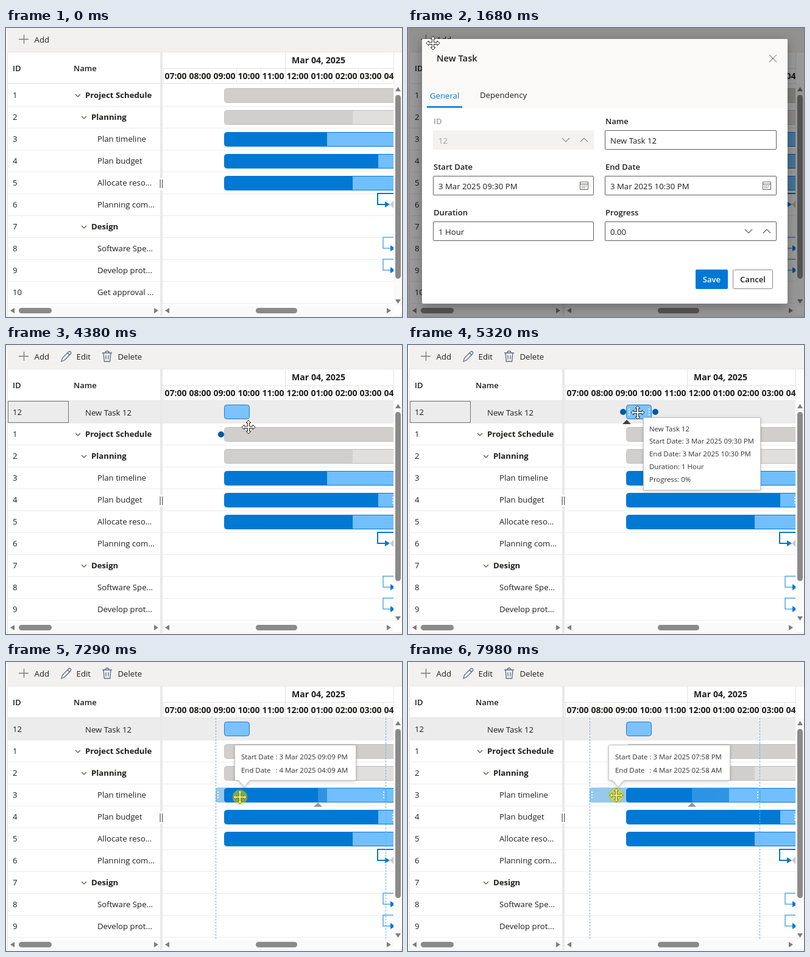
Recreate the animation shown at these times as an HTML page. Size 650x475 px, loop 8000 ms.

```html
<!DOCTYPE html>
<html lang="en">
<head>
<meta charset="utf-8">
<title>Project schedule</title>
<style>
html, body { margin: 0; width: 100%; height: 100%; overflow: hidden; background: #fff; }
svg { display: block; width: 650px; height: 475px; }
text { font: 13.2px "Open Sans", "Noto Sans", sans-serif; fill: #1f1e1d; white-space: pre; }
.b { font-weight: 700; font-size: 13.2px; }
.s { font-weight: 600; font-size: 13.1px; }
.h { font-weight: 700; font-size: 14.1px; text-anchor: middle; }
.title { font-weight: 600; font-size: 14.7px; }
.tip text { font-size: 11.45px; fill: #323130; }
.tip path { fill: #fff; stroke: #c4c4c4; filter: drop-shadow(0 1px 2px rgba(0,0,0,.25)); }
.line { fill: none; stroke: #605e5c; }
</style>
</head>
<body>
<svg id="stage" viewBox="0 0 650 475" xmlns="http://www.w3.org/2000/svg"></svg>
<script>
const BLUE = '#0078d4', LIGHT = '#71bfff', LOOP = 8000, ROW = 36, TOP = 92;

const rect = (x, y, w, h, fill, more = '') =>
  `<rect x="${x}" y="${y}" width="${w}" height="${h}" fill="${fill}" ${more}/>`;
const text = (x, y, s, more = '') => `<text x="${x}" y="${y}" ${more}>${s}</text>`;
const path = (d, more = 'class="line"') => `<path d="${d}" ${more}/>`;
const group = (id, body, more = '') => `<g id="${id}" ${more}>${body}</g>`;
const chevron = (x, y, r, up, color = '#605e5c') => {
  const k = up ? -r / 2 : r / 2;
  return path(`M${x - r} ${y - k}L${x} ${y + k}L${x + r} ${y - k}`, `fill="none" stroke="${color}" stroke-width="1.2"`);
};
const dots = (x, y) => [-4.5, 0, 4.5].map(d => rect(x - 1, y + d - 1, 2, 2, '#fff', 'opacity=".9"')).join('');
const knob = (x, y) => `<circle cx="${x}" cy="${y}" r="5" fill="#005a9e"/>`;
const mark = (x, y, fill) => path(`M${x - 7} ${y}L${x} ${y - 7}L${x + 7} ${y}Z`, `fill="${fill}"`);

// Task rows: name, indent level, progress edge, kind
const tasks = [
  ['Project Schedule', 0, 640, 'sum'],
  ['Planning', 1, 569, 'sum'],
  ['Plan timeline', 2, 527, 'task'],
  ['Plan budget', 2, 611, 'task'],
  ['Allocate reso...', 2, 569, 'task'],
  ['Planning com...', 2, 0, 'stone'],
  ['Design', 1, 0, ''],
  ['Software Spe...', 2, 0, 'link'],
  ['Develop prot...', 2, 0, 'link'],
  ['Get approval ...', 2, 0, '']
];

const bar = (y, edge, kind) => {
  const [dark, pale, rim] = kind === 'sum' ? ['#d0cfce', '#e1dfdd', '#bdbbb9'] : [BLUE, LIGHT, BLUE];
  return rect(358.5, y + 7.5, 300, 23, pale, `rx="4" stroke="${rim}"`) +
    path(`M${edge} ${y + 8}H362.5q-4 0-4 4v14q0 4 4 4H${edge}z`, `fill="${dark}"`);
};

const link = (x, y, color, w) =>
  path(`M640 ${y - 18}H${x}V${y}H${x + 14}`, `fill="none" stroke="${color}" stroke-width="${w}"`) +
  path(`M${x + 12} ${y - 5}l8 5-8 5z`, `fill="${BLUE}"`);

function drawRow([name, level, edge, kind], i) {
  const y = TOP + i * ROW, mid = y + 18, bold = level < 2;
  const x = 130 + level * 10;
  let out = text(11, mid + 5, i + 1) + text(x, mid + 5, name, bold ? 'class="b"' : '');
  if (bold) out += chevron(x - 12, mid + 1, 4, false, '#5a5046');
  out += rect(3, y + ROW, 633, 1, '#ececec');
  let chart = '';
  if (edge) chart = bar(y, edge, kind);
  if (kind === 'stone') chart = link(610, mid, '#0a74c9', 2) + path(`M630 ${mid}l9-9v18z`, 'fill="#cbc9c7"');
  if (kind === 'link') chart = link(619, mid, '#55a9ea', 1.5);
  return out + `<g clip-path="url(#chart)">${chart}</g>`;
}

const thumb = (x, y, w, h, id = '') => rect(x, y, w, h, '#8a8a8a', `rx="4.5" ${id}`);
const arrow = d => path(d, 'fill="#7d7d7d"');

function frameParts() {
  let out = rect(2, 0, 648, 39, '#f2f1f0') + rect(2, 39, 648, 1, '#e8e7e6');
  out += rect(2, 40, 1, 433, '#e4e4e4') + rect(2, 472.5, 648, 1, '#e4e4e4');
  out += rect(3, 91, 633, 1, '#e4e4e4') + rect(257, 66, 379, 1, '#e4e4e4') + rect(636, 40, 1, 52, '#e4e4e4');
  out += text(11, 71, 'ID', 'class="s"') + text(111, 71, 'Name', 'class="s"');
  out += rect(458, 40, 1, 26, '#e4e4e4') + text(513, 58, 'Mar 04, 2025', 'class="h"');
  let hours = '';
  for (let i = 0; i < 10; i++) {
    const h = String((i + 6) % 12 + 1).padStart(2, '0');
    hours += rect(258 + i * 40, 66, 1, 25, '#e4e4e4') + text(278.5 + i * 40, 84, h + ':00', 'class="h"');
  }
  return out + `<g clip-path="url(#chart)">${hours}</g>`;
}

function bars() {
  return rect(3, 457, 633, 16, '#fafafa') + rect(636, 92, 14, 365, '#fafafa') +
    thumb(21, 460, 54, 9) + thumb(410, 460, 68, 9) + thumb(639, 110, 9, 302, 'id="vthumb"') +
    arrow('M7 464.5l7-4.5v9z') + arrow('M250 464.5l-7-4.5v9z') +
    arrow('M261 464.5l7-4.5v9z') + arrow('M632 464.5l-7-4.5v9z') +
    arrow('M643.5 97l4.5 7h-9z') + arrow('M643.5 453l4.5-7h-9z') +
    rect(253, 40, 4, 433, '#e9e9e9') + rect(251, 246, 8, 20, '#fff') +
    rect(252.5, 249, 1.3, 14, '#605e5c') + rect(256, 249, 1.3, 14, '#605e5c');
}

function tools() {
  const pen = path('M91 27l1.5-5.5L103 11q1.5-1.2 3 .3t.3 3L96 25zM101 13l3.5 3.5', 'fill="none" stroke="#5c6b82" stroke-width="1.3"');
  const bin = path('M158 13h16M163 13q0-3 3-3t3 3M160 13l1.3 14h9.4L172 13M164 17v6.5M168 17v6.5', 'fill="none" stroke="#5c6b82" stroke-width="1.3"');
  return rect(11, 0, 69, 39, '#e3e1df', 'id="addHover"') +
    path('M21 18.5h16M29.5 11v15', 'stroke="#7b7774" stroke-width="1.3"') + text(46.6, 24, 'Add') +
    group('extra', pen + text(115.6, 24, 'Edit') + bin + text(183.4, 24, 'Delete'));
}

function newRow() {
  return rect(3, 92, 633, 36, '#edecec') + rect(3, 128, 633, 1, '#ececec') +
    rect(3.5, 92.5, 99, 35, 'none', 'id="cell" stroke="#767472"') +
    text(11, 115, '12') + text(130, 116, 'New Task 12') +
    rect(358.5, 98.5, 41, 23, '#7cc2fd', 'rx="4" stroke="#0f80d8"') +
    `<g clip-path="url(#chart)">${dots(635, 255)}</g>`;
}

const calendar = (x, y) => path(`M${x - 6.5} ${y - 6}h13v12.5h-13zM${x - 6.5} ${y - 2.5}h13`) +
  path(`M${x - 4} ${y + 0.5}h8.5M${x - 4} ${y + 3.5}h6`, 'fill="none" stroke="#605e5c" stroke-width="1.5" stroke-dasharray="1.6 1.6"');

function field(col, row, label, value, kind) {
  const x = col ? 323 : 41, w = col ? 282 : 264, y = 168 + row * 75, off = kind === 'off';
  let out = text(x + 1, y - 10, label, off ? 'class="s" style="fill:#a19f9d"' : 'class="s"');
  out += off ? rect(x, y, w, 32, '#f3f2f1')
    : rect(x + .5, y + .5, w - 1, 31, '#fff', 'rx="1.5" stroke="#605e5c"');
  out += text(x + 9, y + 22, value, off ? 'style="fill:#a19f9d"' : '');
  const end = x + w - 16;
  if (kind === 'date') out += calendar(end, y + 16);
  if (kind === 'spin' || off)
    out += chevron(end - 30, y + 16, 6, false, off ? '#8a8886' : '#605e5c') + chevron(end, y + 16, 6, true, off ? '#8a8886' : '#605e5c');
  return out;
}

function dialog() {
  return rect(23, 18, 600, 435, '#fff', 'rx="2" style="filter:drop-shadow(0 5px 9px rgba(0,0,0,.3))"') +
    rect(23, 18, 600, 113.5, '#faf9f8', 'rx="2"') +
    text(47, 55, 'New Task', 'class="title"') + path('M593 44l12 12M605 44l-12 12') +
    text(36, 116, 'General', `style="fill:${BLUE}"`) + text(118, 115, 'Dependency') +
    rect(31, 128.5, 58, 2.5, BLUE, 'id="tab"') +
    field(0, 0, 'ID', '12', 'off') + field(1, 0, 'Name', 'New Task 12') +
    field(0, 1, 'Start Date', '3 Mar 2025 09:30 PM', 'date') + field(1, 1, 'End Date', '3 Mar 2025 10:30 PM', 'date') +
    field(0, 2, 'Duration', '1 Hour') + field(1, 2, 'Progress', '0.00', 'spin') +
    rect(472, 397, 53, 32, BLUE, 'id="save" rx="2"') +
    text(498.5, 418, 'Save', 'id="saveText" class="s" text-anchor="middle"') +
    rect(533.5, 397.5, 65, 31, '#fff', 'rx="2" stroke="#8a8886"') +
    text(566, 418, 'Cancel', 'class="s" text-anchor="middle"');
}

function tip() {
  const lines = ['New Task 12', 'Start Date: 3 Mar 2025 09:30 PM', 'End Date: 3 Mar 2025 10:30 PM', 'Duration: 1 Hour', 'Progress: 0%'];
  return path('M386.5 119.5h192v119h-192z', '') + lines.map((s, i) => text(396, 141.5 + i * 20.8, s)).join('');
}

// Dragged bar, drawn with its left edge at x = 0
function drag() {
  const guide = x => path(`M${x} 92V457`, 'stroke="#62b5ec" stroke-dasharray="3 2"');
  return guide(.5) + guide(279.5) +
    `<g opacity=".4">${rect(0, 206.5, 281, 24.5, LIGHT, 'rx="4"')}${path('M4 206.500H168V231H4q-4 0-4-4v-16.500q0-4 4-4z', `fill="${BLUE}"`)}</g>` +
    path('M168 207H276q4 0 4 4v15.500q0 4-4 4H168z', `fill="none" stroke="${BLUE}" opacity=".4"`) +
    dots(4, 218.5) + dots(276, 218.5) + mark(168, 238, '#93989c') +
    `<g class="tip">${path('M33.500 136.500h195q2 0 2 2v54q0 2-2 2H56l-9 11-9-11h-4.500q-2 0-2-2v-54q0-2 2-2z', '')}` +
    text(42, 159.5, 'Start Date') + text(98.5, 159.5, '', 'id="from"') +
    text(42, 181.5, 'End Date') + text(98.5, 181.5, '', 'id="to"') + '</g>';
}

const MOVE = 'M0-11L4-7H1.500V-1.500H7V-4L11 0 7 4V1.500H1.500V7H4L0 11-4 7H-1.500V1.500H-7V4L-11 0-7-4V-1.500H-1.500V-7H-4Z';
const POINTER = 'M.5.5V16.500L4.300 13 7 19.200 9.800 18 7.200 12H12Z';

const stage = document.getElementById('stage');
stage.innerHTML =
  '<defs><clipPath id="chart"><path d="M257 40H636V457H257z"/></clipPath><clipPath id="body"><path d="M0 92H636V457H0z"/></clipPath></defs>' +
  rect(0, 0, 650, 475, '#fff') + frameParts() + tools() +
  `<g clip-path="url(#body)">${group('rows', tasks.map(drawRow).join(''))}${group('fresh', newRow())}${group('hover', '')}</g>` +
  `<g clip-path="url(#chart)">${group('drag', drag())}</g>` + bars() +
  group('tip', tip(), 'class="tip"') +
  group('veil', rect(0, 0, 650, 475, '#000', 'opacity=".4"')) + group('dialog', dialog()) +
  group('cursor', path(MOVE, 'id="move" fill="#fff" stroke="#222"') +
    path(POINTER, 'id="pointer" fill="#fff" stroke="#111"') +
    '<circle id="press" r="12" fill="#dede00" fill-opacity=".5" stroke="#8f9a2a" stroke-opacity=".4"/>');

const el = {};
stage.querySelectorAll('[id]').forEach(n => el[n.id] = n);
const show = (n, on) => n.style.display = on ? '' : 'none';
const set = (n, o) => { for (const k in o) n.setAttribute(k, o[k]); };

const smooth = p => p * p * (3 - 2 * p);
const out = n => p => 1 - (1 - p) ** n;
const mix = (a, b, p) => a + (b - a) * p;

// Pointer moves: start, end, steps, from, to, easing of x and y
const moves = [
  [820, 1560, 11, [590, 480], [41, 25], smooth, smooth],
  [2170, 2900, 12, [41, 25], [495, 410], smooth, smooth],
  [3920, 4790, 13, [495, 410], [377, 111], out(2.24), out(3.27)],
  [6270, 6880, 10, [377, 111], [397, 222], smooth, smooth]
];

function pointerAt(t) {
  let pos = [590, 490];
  for (const [a, b, n, p, q, ex, ey] of moves) {
    if (t < a) break;
    const k = Math.min(n, Math.floor((t - a) * (n - 1) / (b - a) + .001) + 1) / n;
    pos = [mix(p[0], q[0], ex(k)), mix(p[1], q[1], ey(k))];
  }
  return pos.map(Math.round);
}

const pad = n => String(n).padStart(2, '0');
function clock(m) {
  const day = m < 1440 ? 3 : 4, h = Math.floor(m / 60) % 24;
  return `: ${day} Mar 2025 ${pad(h % 12 || 12)}:${pad(m % 60)} ${h < 12 ? 'AM' : 'PM'}`;
}

function hoverBar(x, y, added) {
  const k = Math.floor((y - TOP) / ROW), off = y - TOP - k * ROW;
  const i = added ? k - 1 : k, fresh = added && k === 0;
  if (off < 6 || off > 31 || x < 358 || x > (fresh ? 400 : 636)) return '';
  const mid = TOP + k * ROW + 18;
  if (fresh) return knob(353, mid) + knob(406, mid) + dots(363, mid) + dots(396, mid) + mark(359, 130, '#3b3f46');
  if (i < 0 || i > 4) return '';
  const [, , edge, kind] = tasks[i];
  return knob(353, mid + 1) + (kind === 'task' ? dots(363, mid + 1) + mark(edge, mid + 20, '#3b3f46') : '');
}

function render(t) {
  const open = t >= 1630 && t < 3380, added = t >= 3220, done = t >= 3380, dragging = t >= 7080;
  let [x, y] = pointerAt(t);

  set(el.rows, { transform: `translate(0 ${added ? ROW : 0})` });
  show(el.fresh, added);
  show(el.extra, done);
  show(el.cell, !dragging);
  set(el.vthumb, { height: added ? 278 : 302 });
  show(el.addHover, t < 1680 && x < 80 && y < 39);

  show(el.veil, open);
  show(el.dialog, open);
  set(el.dialog, { opacity: t < 1680 ? .5 : 1 });
  const grow = Math.min(3, t < 1880 ? 0 : Math.floor((t - 1880) / 70) + 1) / 3 * 8;
  set(el.tab, { x: 31 - grow, width: 58 + grow * 2 });
  const busy = t >= 3120, over = x > 471 && x < 526 && y > 396 && y < 430;
  set(el.save, { fill: busy ? '#f3f2f1' : over ? '#106ebe' : BLUE });
  el.saveText.style.fill = busy ? '#a19f9d' : '#fff';

  const marks = open || dragging ? '' : hoverBar(x, y, added);
  if (el.hover.innerHTML !== marks) el.hover.innerHTML = marks;
  show(el.tip, t >= 5320 && t < 6270);

  show(el.drag, dragging);
  if (dragging) {
    const step = t >= 7980 ? 7980 : t - (t - 7080) % 70;
    const p = (step - 7290) / 690;
    x = mix(384, 342, p);
    y = mix(222, 219, p);
    set(el.drag, { transform: `translate(${Math.round(mix(343.6, 298, p))} 0)` });
    const m = Math.round(mix(1269, 1198, p));
    el.from.textContent = clock(m);
    el.to.textContent = clock(m + 420);
  }

  const cross = dragging || marks || (open && y > 18 && y < 92 && x > 23);
  show(el.cursor, t >= 820);
  set(el.cursor, { transform: `translate(${Math.round(x)} ${Math.round(y)})` });
  show(el.move, cross);
  show(el.pointer, !cross);
  show(el.press, dragging || (t >= 3050 && t < 3120));
}

const start = performance.now();
function tick() {
  render((performance.now() - start) % LOOP);
  requestAnimationFrame(tick);
}
tick();
</script>
</body>
</html>
```
